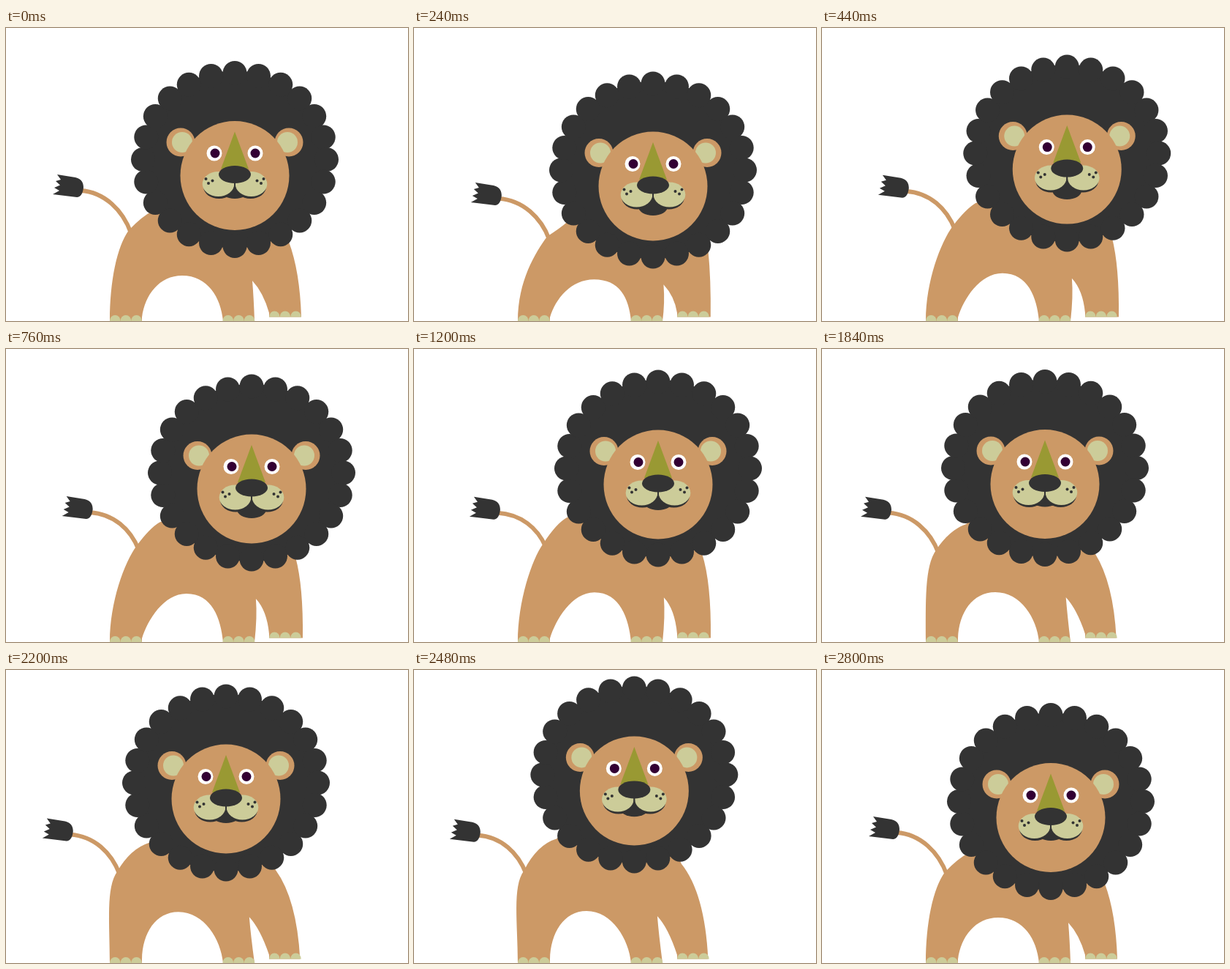
Recreate the animation shown at these times as an HTML page with a canvas. Size 550 px wide and 400 px high, loop 2840 ms.

```html
<!DOCTYPE html>
<html lang="en">
<head>
<meta charset="utf-8">
<title>Dancing lion</title>
<style>
html, body { margin: 0; width: 100%; height: 100%; overflow: hidden; background: #fff; }
canvas { display: block; }
</style>
</head>
<body>
<canvas id="stage" width="550" height="400"></canvas>
<script>
const ctx = document.getElementById('stage').getContext('2d');
const FUR = '#cc9966', CREAM = '#cccc99', DARK = '#333333', OLIVE = '#999933', PUPIL = '#330033';
const STEP = 40, CYCLE = 2800, LOOP = 2840;
const SIDES = [-1, 1];

// Key poses of the dance: time, face x, face y, chin drop
const poses = [
  [0, 313, 201.5, 31.5], [240, 327, 216, 40], [500, 336, 189.5, 41], [760, 336, 191, 40],
  [1000, 336, 177.5, 38], [1200, 334, 185, 35], [1620, 326, 200, 31.5], [1840, 305, 184.5, 31],
  [2200, 301, 176, 33], [2430, 301, 163.5, 35.5]
];

// Cyclic cubic interpolation that never overshoots its keys
function poseAt(t) {
  const n = poses.length;
  const at = (i, c) => poses[(i + n) % n][c] + (c ? 0 : Math.floor(i / n) * CYCLE);
  const i = poses.findLastIndex(p => p[0] <= t);
  const span = at(i + 1, 0) - at(i, 0), s = (t - at(i, 0)) / span;
  return [1, 2, 3].map(c => {
    const secant = j => (at(j + 1, c) - at(j, c)) / (at(j + 1, 0) - at(j, 0));
    const slope = j => {
      const a = secant(j - 1), b = secant(j);
      return a * b > 0 ? 2 * a * b / (a + b) : 0;
    };
    const p = at(i, c), q = at(i + 1, c);
    return p + (q - p) * s * s * (3 - 2 * s)
      + span * s * (1 - s) * (slope(i) * (1 - s) - slope(i + 1) * s);
  });
}

// The body follows the head: it leans sideways and stretches with its height
function bodyAt(x, y) {
  const lean = Math.tanh((x - 313) / 10), drop = y - 201.5, pull = drop * (1 + lean);
  return {
    lean,
    tuft: [104 + 14 * lean + 0.1 * drop, 222 + Math.max(0.75 * drop, -0.1 * drop)],
    rump: [168 + 12.6 * lean + 0.2 * drop, 276 + 0.32 * pull],
    back: [202 + 8 * lean, 249 + 0.45 * drop + 0.36 * pull],
    chest: [387 + 12.5 * lean + 0.3 * drop, 292 + 0.75 * drop],
    belly: [241 + 6 * lean, 338 + 10 * Math.tanh(drop / 25)]
  };
}

function ellipse(color, x, y, rx, ry = rx) {
  ctx.fillStyle = color;
  ctx.beginPath();
  ctx.ellipse(x, y, rx, ry, 0, 0, Math.PI * 2);
  ctx.fill();
}

function toes(left, base) {
  ctx.fillStyle = CREAM;
  for (let i = 0; i < 3; i++) {
    ctx.beginPath();
    ctx.ellipse(left + 7.3 + i * 14.6, base, 7.3, 8, 0, Math.PI, 0);
    ctx.fill();
  }
}

function drawTail({ tuft: [tx, ty], rump: [rx, ry] }) {
  ctx.strokeStyle = FUR;
  ctx.lineWidth = 5.8;
  ctx.beginPath();
  ctx.moveTo(tx - 2, ty);
  ctx.bezierCurveTo(tx + 31, ty + 2, rx - 8, (ry + ty) / 2, rx + 3, ry + 4);
  ctx.stroke();

  ctx.save();
  ctx.translate(tx, ty);
  ctx.fillStyle = DARK;
  ctx.beginPath();
  ctx.moveTo(-9, -18);
  ctx.bezierCurveTo(0, -16, 2, -10, 2, -4);
  ctx.bezierCurveTo(1, 4, -2, 9, -7, 9);
  for (let i = 0; i < 4; i++) {
    ctx.lineTo(-40 + 2 * i, 5 - 9 * i);
    if (i < 3) ctx.lineTo(-31 + i, -7.5 * i);
  }
  ctx.fill();
  ctx.restore();
}

function drawBody(x, y, { lean, rump: [rx, ry], back, chest, belly: [bx, by] }) {
  const gapX = 337 + 5 * lean, gapY = by + 7;
  ctx.fillStyle = FUR;
  ctx.beginPath();
  ctx.moveTo(142, 400);
  ctx.bezierCurveTo(142, 345, rx - 16, ry + 22, rx, ry);
  ctx.quadraticCurveTo(rx + 18, back[1] + 8, ...back);
  ctx.lineTo(x - 60, y + 20);
  ctx.lineTo(x + 40, y + 40);
  ctx.lineTo(...chest);
  ctx.quadraticCurveTo(402 + 5 * lean, chest[1] + 40, 404 + 2 * lean, 394.5);
  ctx.lineTo(360, 394.5);
  ctx.lineTo(360, 389);
  ctx.quadraticCurveTo(gapX + 15, gapY + 16, gapX, gapY);
  ctx.quadraticCurveTo(gapX + 2, gapY + 25, 340, 400);
  ctx.lineTo(297, 400);
  ctx.bezierCurveTo(294, 368, bx + 35, by, bx, by);
  ctx.bezierCurveTo(bx - 31, by, 190 + 4 * lean, 364 + 6 * lean, 186, 395);
  ctx.lineTo(186, 400);
  ctx.fill();
  toes(142, 400);
  toes(296.5, 400);
  toes(360, 394.5);
}

function drawHead(x, y, chin) {
  ctx.save();
  ctx.translate(x, y);

  ellipse(DARK, 0, -22, 129, 121);
  for (let i = 0; i < 24; i++) {
    const a = i * Math.PI / 12;
    ellipse(DARK, Math.sin(a) * 125.5, -22 - Math.cos(a) * 118, 16.5);
  }
  for (const s of SIDES) {
    ellipse(FUR, s * 74, -45.5, 19.5);
    ellipse(CREAM, s * 72, -45.5, 14);
  }
  ellipse(FUR, 0, 0, 74.5);

  for (const s of SIDES) {
    ellipse('#fff', s * 28, -30.5, 10.5);
    ellipse(PUPIL, s * 27.5 + 0.5, -30.5, 6.5);
  }
  ctx.fillStyle = OLIVE;
  ctx.beginPath();
  ctx.moveTo(0, -60);
  ctx.lineTo(19, -9);
  ctx.lineTo(-19, -9);
  ctx.fill();

  ellipse(DARK, 0, chin - 12, 20, 12);
  for (const s of SIDES) ellipse(DARK, s * 21.5, 15, 21.5, 16.5);
  for (const s of SIDES) {
    ellipse(CREAM, s * 22.5, 11.5, 21.8, 17);
    for (const [dx, dy] of [[39.5, 4.5], [30.5, 7], [36, 10.5]]) ellipse(DARK, s * dx, dy, 2);
  }
  ctx.fillRect(-1, 0, 2, 25);
  ellipse(DARK, 0, -1.5, 22, 12);
  ctx.restore();
}

function draw(now) {
  const t = Math.floor(now % LOOP / STEP) * STEP % CYCLE;
  const [x, y, chin] = poseAt(t);
  const body = bodyAt(x, y);
  ctx.clearRect(0, 0, 550, 400);
  drawTail(body);
  drawBody(x, y, body);
  drawHead(x, y, chin);
}

const start = performance.now();
function tick() {
  draw(performance.now() - start);
  requestAnimationFrame(tick);
}
tick();
</script>
</body>
</html>
```
